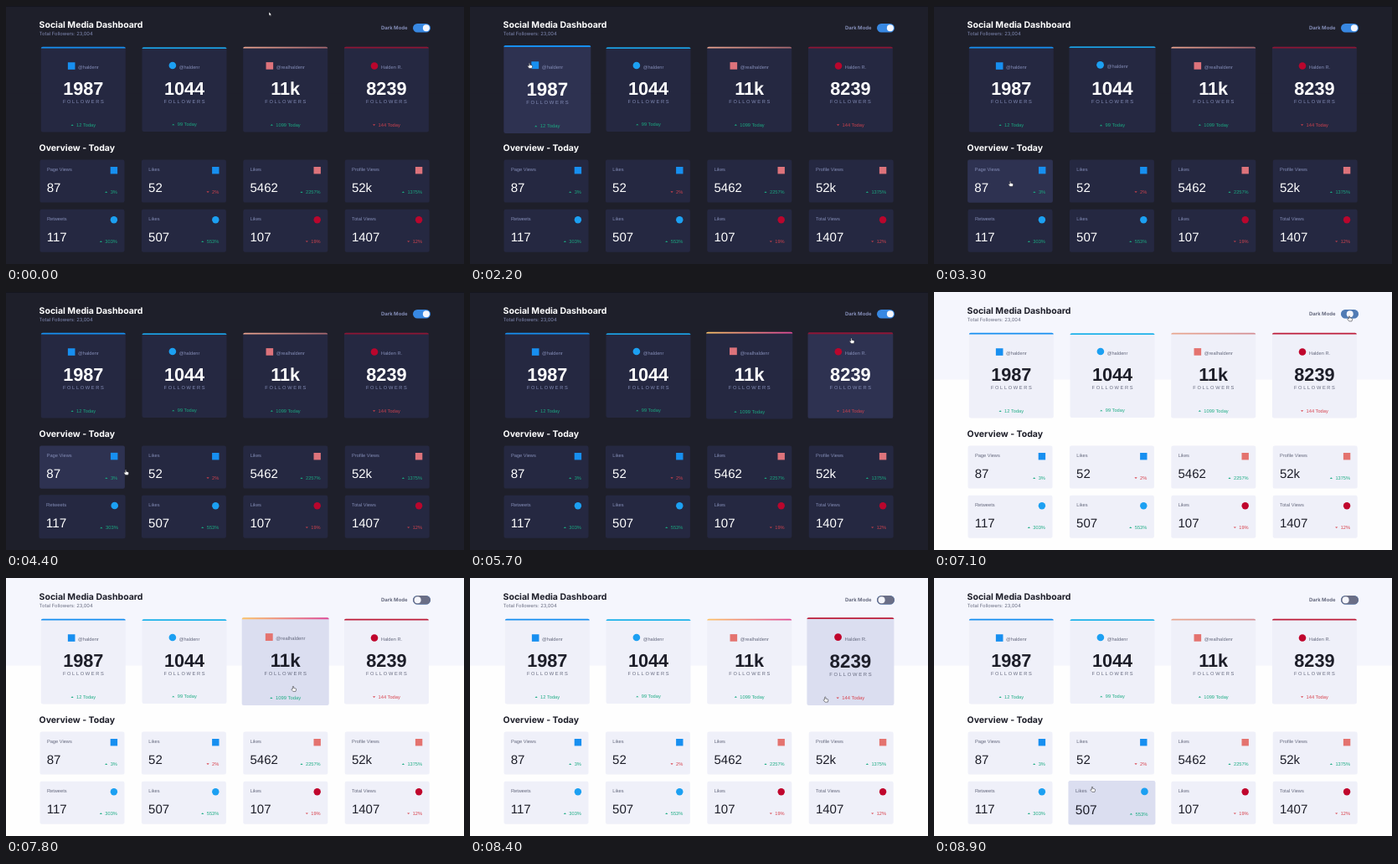
An HTML page that plays this animation: 547x308 px, repeating every 9000 ms.

```html
<!DOCTYPE html>
<html lang="en">
<head>
<meta charset="utf-8">
<title>Social Media Dashboard</title>
<style>
html, body { margin: 0; width: 100%; height: 100%; overflow: hidden; background: #1e1f2a; }
svg {
  display: block; width: 100vw; height: 100vh;
  text-rendering: geometricPrecision;
  --bg: #1e1f2a; --head: #1e1f2a; --edge: #15161e;
  --card: #252841; --hover: #2e3251;
  --ink: #fff; --soft: #838cb6;
  --up: #1ba780; --down: #cc424e;
  --fb: #178ff0; --tw: #1ca0f2; --ig: #dd737b; --yt: #b9062d;
  --tw-bar: #1b9fe0; --yt-bar: #8d1534; --ig-bar: url(#igDark);
}
svg.light {
  --bg: #fefefe; --head: #f5f6fd; --edge: #f5f6fd;
  --card: #eff0f9; --hover: #dbdef0;
  --ink: #1d1e29; --soft: #666a7f;
  --up: #20ad86; --down: #d8424d;
  --ig: #e4736f; --yt: #c0062d;
  --tw-bar: #1cb2ea; --yt-bar: #bd1e3a; --ig-bar: url(#igLight);
}
text { font-family: "Liberation Sans", Arial, sans-serif; font-size: 5.7px; fill: var(--soft); white-space: pre; }
.inter { font-family: Inter, sans-serif; }
.title { font-size: 10.5px; font-weight: 700; fill: var(--ink); }
.sub { font-size: 5.8px; }
.mode { font-size: 5.95px; font-weight: 700; }
.big { font-size: 21.7px; font-weight: 700; fill: var(--ink); text-anchor: middle; }
.mid { font-size: 15px; fill: var(--ink); }
.caps { letter-spacing: 1.65px; }
.up { fill: var(--up); }
.down { fill: var(--down); }
.face { fill: var(--card); }
.hot .face { fill: var(--hover); }
.fb { fill: var(--fb); }
.tw { fill: var(--tw); }
.ig { fill: var(--ig); }
.yt { fill: var(--yt); }
.bar.tw { fill: var(--tw-bar); }
.bar.ig { fill: var(--ig-bar); }
.bar.yt { fill: var(--yt-bar); }
.grown .bar.ig { fill: url(#igHot); }
#cursor path { fill: #fff; stroke: #16171f; stroke-width: .5; stroke-linejoin: round; }
</style>
</head>
<body>
<svg id="stage" viewBox="0 0 547 308" preserveAspectRatio="none">
  <defs>
    <linearGradient id="igDark"><stop stop-color="#eda58f"/><stop offset="1" stop-color="#a5666d"/></linearGradient>
    <linearGradient id="igLight"><stop stop-color="#e9a78f"/><stop offset="1" stop-color="#d38d94"/></linearGradient>
    <linearGradient id="igHot"><stop stop-color="#fdc468"/><stop offset="1" stop-color="#df4996"/></linearGradient>
  </defs>
  <rect width="547" height="308" fill="var(--bg)"/>
  <rect width="547" height="104.5" fill="var(--head)"/>
  <rect width="547" height="1" fill="var(--edge)"/>
  <text class="inter title" x="39.6" y="26">Social Media Dashboard</text>
  <text class="inter sub" x="39.8" y="34.5">Total Followers: 23,004</text>
  <text class="inter mode" x="448" y="28.3">Dark Mode</text>
  <text class="inter title" x="39.6" y="172.6">Overview - Today</text>
  <rect x="486" y="21" width="21" height="10.6" rx="5.3" fill="#3888e2"/>
  <rect id="off" x="486" y="21" width="21" height="10.6" rx="5.3" fill="#6a6e86"/>
  <circle id="knob" cy="26.3" r="4" fill="#f5f6fc"/>
  <g id="cards"></g>
  <g id="cursor">
    <path id="arrow" d="M0 0V4.6L1.1 3.7 1.9 5.3 2.7 4.9 2 3.4H3.4Z"/>
    <path id="hand" d="M-.6 .5Q0-.5 .6 .5V2.3L2.9 2.9Q3.8 3.2 3.6 4.2L3 6.4H-.2L-2.3 3.9Q-2 3-.6 3.5Z"/>
  </g>
</svg>
<script>
const LOOP = 9000, TICK = 100, THEME_AT = 7100, TRAVEL = 200, GROW = 0.03;
const $ = id => document.getElementById(id);
const clamp = v => Math.max(0, Math.min(1, v));
const cards = [];

function add(parent, tag, attrs, text) {
  const el = document.createElementNS("http://www.w3.org/2000/svg", tag);
  for (const k in attrs) el.setAttribute(k, attrs[k]);
  if (text) el.textContent = text;
  parent.appendChild(el);
  return el;
}

const label = (g, cls, x, y, text) => add(g, "text", { class: cls, x, y }, text);

// Plain marks: squares for fb and ig, circles for tw and yt
function mark(g, kind, cx, cy, size) {
  const r = size / 2;
  if (kind === "tw" || kind === "yt") add(g, "circle", { class: kind, cx, cy, r });
  else add(g, "rect", { class: kind, x: cx - r, y: cy - r, width: size, height: size });
}

// Arrow and text; align 0.5 centres the pair on x, 1 ends it there
function trend(g, x, y, align, text) {
  const dir = text[0] === "+" ? "up" : "down", s = dir === "up" ? 1 : -1;
  const el = label(g, dir, 0, y, text.slice(1)), lead = 6.6;
  const left = x - (lead + el.getComputedTextLength()) * align, cy = y - 1.9;
  el.setAttribute("x", left + lead);
  add(g, "path", { class: dir, d: `M${left} ${cy + s * .8}l1.6 ${-s * 1.7} 1.6 ${s * 1.7}z` });
}

function card(x, y, w, h) {
  const g = add($("cards"), "g", {});
  add(g, "rect", { class: "face", x, y, width: w, height: h, rx: 2.2 });
  cards.push({ g, x, y, w, h, cx: x + w / 2, cy: y + h / 2 });
  return g;
}

// Tall cards share a centre line; the icon's height sets the card's height
[
  ["fb", 8.9, "@haldenr", "1987", "+12 Today"],
  ["tw", 7.7, "@haldenr", "1044", "+99 Today"],
  ["ig", 8.6, "@realhaldenr", "11k", "+1099 Today"],
  ["yt", 8.7, "Halden R.", "8239", "-144 Today"]
].forEach(([kind, icon, name, count, change], i) => {
  const h = 93 + icon, x = 41.8 + i * 120.7, y = 99.6 - h / 2;
  const mid = x + 50.5, base = y + h;
  const g = card(x, y, 101, h);
  add(g, "path", { class: "bar " + kind, d: `M${x} ${y + 1.8}q0-1.8 2-1.8h97q2 0 2 1.8z` });
  const who = label(g, "", 0, base - 75.2, name);
  const left = mid - (12.1 + who.getComputedTextLength()) / 2;
  who.setAttribute("x", left + 12.1);
  mark(g, kind, left + 4.3, base - 79, 8.6);
  label(g, "big", mid, base - 44.1, count);
  label(g, "caps", mid - 24.4, base - 34.4, "FOLLOWERS");
  trend(g, mid, base - 6.5, .5, change);
});

[
  ["Page Views", "fb", "87", "+3%"],
  ["Likes", "fb", "52", "-2%"],
  ["Likes", "ig", "5462", "+2257%"],
  ["Profile Views", "ig", "52k", "+1375%"],
  ["Retweets", "tw", "117", "+303%"],
  ["Likes", "tw", "507", "+553%"],
  ["Likes", "yt", "107", "-19%"],
  ["Total Views", "yt", "1407", "-12%"]
].forEach(([name, kind, count, change], i) => {
  const x = 40.5 + i % 4 * 121.4, y = 183.6 + Math.floor(i / 4) * 59.1;
  const g = card(x, y, 101, 51);
  label(g, "", x + 8.4, y + 13.6, name);
  mark(g, kind, x + 88.4, y + 12.6, 8.4);
  label(g, "mid", x + 8.2, y + 38.5, count);
  trend(g, x + 92.4, y + 40.4, 1, change);
});

// Pointer stops: arrival time and place
const over = i => [cards[i].cx, cards[i].cy];
const stops = [
  [0, 314, 7], [700, 149, 218], [1200, 246, 7], [1600, ...over(3)],
  [1800, 32, 130], [2100, 71, 68], [2500, ...over(1)], [2800, ...over(2)],
  [3000, ...over(1)], [3300, ...over(4)], [3500, ...over(5)], [3700, ...over(9)],
  [3900, ...over(8)], [4400, 143, 212], [4600, ...over(5)], [5100, ...over(6)],
  [5300, ...over(2)], [5700, 455.5, 55], [6300, 496, 28.5], [7600, 343, 129],
  [8200, ...over(3)], [8500, ...over(10)], [8700, 189, 249]
];

// Rests at each stop, then speeds up into the next one
function pointer(t) {
  const next = stops.findIndex(s => s[0] > t);
  if (next < 0) return stops[stops.length - 1].slice(1);
  const [, x0, y0] = stops[next - 1], [t1, x1, y1] = stops[next];
  const k = clamp(1 - (t1 - t) / TRAVEL) ** 2;
  return [x0 + (x1 - x0) * k, y0 + (y1 - y0) * k];
}

const inside = (c, [x, y]) =>
  x > c.x - 2 && x < c.x + c.w + 2 && y > c.y && y < c.y + c.h + 1;

// Growth of every card at every tick; colour follows the pointer at once
const growth = [];
for (let t = 0, now = cards.map(() => 0); t < LOOP; t += TICK) {
  const p = pointer(t);
  now = now.map((v, i) => clamp(v + (inside(cards[i], p) ? 1 : -1) / 3));
  growth.push(now);
}

function draw(t) {
  const p = pointer(t), [px, py] = p;
  const slide = clamp((t - THEME_AT + TICK) / (2 * TICK));
  let link = px > 486 && px < 507 && py > 21 && py < 34;

  $("stage").classList.toggle("light", t >= THEME_AT);
  $("knob").setAttribute("cx", 501.9 - 10.3 * slide);
  $("off").setAttribute("opacity", slide);

  cards.forEach((c, i) => {
    const hot = inside(c, p), v = growth[t / TICK][i];
    const s = 1 + GROW * v * v * (3 - 2 * v);
    c.g.classList.toggle("hot", hot);
    c.g.classList.toggle("grown", v > 0);
    c.g.setAttribute("transform", `translate(${c.cx} ${c.cy}) scale(${s}) translate(${-c.cx} ${-c.cy})`);
    link = link || hot;
  });

  $("cursor").setAttribute("transform", `translate(${px} ${py})`);
  $("arrow").style.display = link ? "none" : "";
  $("hand").style.display = link ? "" : "none";
}

const start = performance.now();
function frame() {
  const t = (performance.now() - start) % LOOP;
  draw(Math.floor(t / TICK) * TICK);
  requestAnimationFrame(frame);
}
frame();
</script>
</body>
</html>
```
